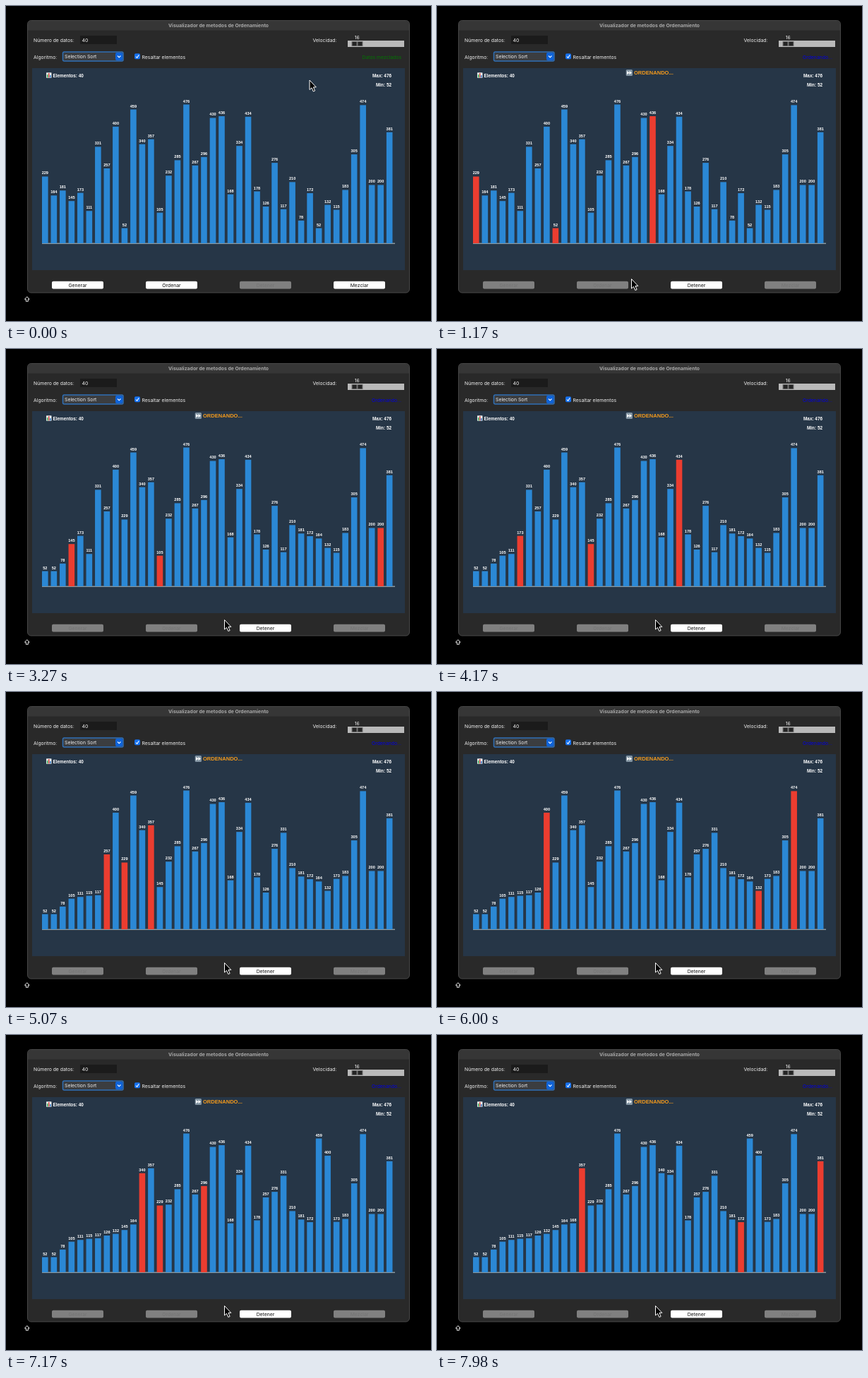
An HTML page for the animation above (8 s loop, 602 by 446 pixels).

```html
<!DOCTYPE html>
<html lang="es">
<head>
<meta charset="utf-8">
<title>Visualizador de metodos de Ordenamiento</title>
<style>
  html, body { margin: 0; width: 100%; height: 100%; overflow: hidden; background: #000; }
  svg { display: block; width: 100%; height: 100%; }
  text { font: 6.85px Inter, sans-serif; fill: #f0f0f0; white-space: pre; }
  .title { font-weight: 700; fill: #a9a9a9; }
  .plot text { font: 700 6.4px "Liberation Sans", Arial, sans-serif; fill: #fff; }
  .plot .value { font-size: 5.6px; }
  .plot .banner { font-size: 7.55px; fill: #f39a1c; }
  .mid { text-anchor: middle; }
  .end { text-anchor: end; }
  .button rect { fill: #fff; }
  .button text { fill: #111; }
  .button.off rect { fill: #808080; }
  .button.off text { fill: #747474; }
</style>
</head>
<body>
<svg viewBox="0 0 602 446">
  <rect x="30.5" y="20.5" width="541" height="385.5" rx="5" fill="#292929" stroke="#555" stroke-width=".8"/>
  <path d="M31 34.5V25.500q0-4.500 4.500-4.500h531q4.500 0 4.500 4.500v9z" fill="#363636"/>
  <text class="title mid" x="301" y="30">Visualizador de metodos de Ordenamiento</text>

  <text x="39" y="51">Número de datos:</text>
  <rect x="105" y="42" width="52" height="12" fill="#1b1b1b"/>
  <text x="107.500" y="50.500">40</text>

  <text x="39" y="74.500">Algoritmo:</text>
  <rect x="80.500" y="65" width="85.500" height="13" rx="2" fill="#3b3d40" stroke="#2f6fb5" stroke-width="1.500"/>
  <rect x="155" y="66" width="10.300" height="11" rx="2" fill="#0f63d8"/>
  <path d="M158 70.500l2.200 2.300 2.200-2.300" fill="none" stroke="#fff" stroke-width="1.100"/>
  <text x="83" y="74">Selection Sort</text>

  <rect x="182" y="67.300" width="8" height="8" rx="1.800" fill="#1671ee"/>
  <path d="M184 71.500l1.600 1.800 2.700-4" fill="none" stroke="#fff" stroke-width="1.100"/>
  <text x="192.500" y="74.500">Resaltar elementos</text>

  <text x="434.500" y="51">Velocidad:</text>
  <text class="mid" x="497.300" y="46.500">16</text>
  <rect x="484" y="49" width="80" height="9" fill="#b9b9b9"/>
  <rect x="489.500" y="50" width="16" height="7" fill="#777"/>
  <path d="M490.500 50.700h6v5.600h-6zM498.500 50.700h6v5.600h-6z" fill="#242424"/>
  <text class="end" id="status" x="560" y="74.500"></text>

  <g class="plot">
    <rect x="37" y="88" width="528" height="286" fill="#263647"/>
    <rect x="57" y="94.300" width="7.500" height="7.500" rx=".6" fill="#e9eef0"/>
    <path d="M58 97h1.500v4.300H58z" fill="#35a853"/>
    <path d="M60 95h1.500v6.300H60z" fill="#d94b42"/>
    <path d="M62 98h1.500v3.300H62z" fill="#3478c9"/>
    <text x="66.500" y="100.500">Elementos: 40</text>
    <text class="end" x="546" y="100.500">Max: 476</text>
    <text class="end" x="546" y="113.500">Min: 52</text>
    <g id="banner">
      <rect x="267.700" y="90" width="9.300" height="9" rx="1.500" fill="#8193a1"/>
      <path d="M269 92l3.500 2.500-3.500 2.500zM272.500 92l3.500 2.500-3.500 2.500z" fill="#fff"/>
      <text class="banner" x="279" y="97.200">ORDENANDO...</text>
    </g>
    <path d="M51 336.300H551" stroke="#8b979d" stroke-width="1.400"/>
    <g id="bars"></g>
  </g>
  <g id="buttons"></g>

  <path id="shift" d="M29.800 411.600l3.300 3.600h-1.800v3h-3v-3h-1.800z" fill="#000" stroke="#eee" stroke-width="1"/>
  <path id="cursor" d="M0 0V13.500L3 10.800 5.300 16 7.600 15 5.400 9.900H9.300z" fill="#000" stroke="#fff" stroke-width="1" stroke-linejoin="round"/>
</svg>
<script>
const LOOP = 8000, TICK = 30, SORT_START = 858, BASE = 336, SCALE = 0.4128;
const data = [
  229, 164, 181, 145, 173, 111, 331, 257, 400, 52, 459, 340, 357, 105, 232, 285, 476, 267, 296, 430,
  436, 168, 334, 434, 178, 126, 276, 117, 210, 78, 172, 52, 132, 115, 183, 305, 474, 200, 200, 381
];
// [time, comparisons made]
const pace = [[SORT_START, 0], [1170, 19.5], [2400, 95.5], [4170, 202.5], [6000, 311.5], [7170, 380.5], [7980, 428.5]];
// [time, x, y]
const route = [[60, 430, 105], [700, 240, 387], [860, 240, 388], [1170, 275.5, 386.5], [1590, 309.5, 383.5]];

const byId = id => document.getElementById(id);
const smooth = u => u * u * (3 - 2 * u);

function add(parent, tag, attrs, text = '') {
  const node = document.createElementNS('http://www.w3.org/2000/svg', tag);
  for (const key in attrs) node.setAttribute(key, attrs[key]);
  node.textContent = text;
  return parent.appendChild(node);
}

function track(points, t, ease = u => u) {
  if (t <= points[0][0]) return points[0].slice(1);
  const k = points.findIndex(p => p[0] > t);
  if (k < 0) return points[points.length - 1].slice(1);
  const [a, b] = [points[k - 1], points[k]];
  const u = ease((t - a[0]) / (b[0] - a[0]));
  return a.slice(1).map((v, n) => v + (b[n + 1] - v) * u);
}

function selectionSteps(source) {
  const list = [...source], steps = [];
  for (let i = 0; i < list.length - 1; i++) {
    const values = [...list];
    let min = i;
    for (let j = i + 1; j < list.length; j++) {
      steps.push({ values, marked: [i, min, j] });
      if (list[j] < list[min]) min = j;
    }
    [list[i], list[min]] = [list[min], list[i]];
  }
  return steps;
}

const steps = selectionSteps(data);
const idle = { values: data, marked: [] };

const bars = data.map((_, i) => {
  const x = 51 + i * 12.51;
  return {
    rect: add(byId('bars'), 'rect', { x, width: 8.6 }),
    label: add(byId('bars'), 'text', { x: x + 4.3, class: 'value mid' })
  };
});

const buttons = ['Generar', 'Ordenar', 'Detener', 'Mezclar'].map((name, i) => {
  const x = 65 + i * 133, group = add(byId('buttons'), 'g', {});
  add(group, 'rect', { x, y: 389.7, width: 73, height: 10.8, rx: 2 });
  add(group, 'text', { x: x + 36.5, y: 397.5, class: 'mid' }, name);
  return group;
});

function drawBars({ values, marked }) {
  bars.forEach(({ rect, label }, i) => {
    const height = values[i] * SCALE, top = BASE - height;
    rect.setAttribute('y', top);
    rect.setAttribute('height', height);
    rect.setAttribute('fill', marked.includes(i) ? '#eb3d30' : '#2b88d5');
    label.setAttribute('y', top - 3);
    label.textContent = values[i];
  });
}

function draw(time) {
  const t = time - time % TICK, sorting = t >= SORT_START;
  drawBars(sorting ? steps[Math.floor(track(pace, t)[0])] : idle);
  byId('banner').style.display = sorting ? '' : 'none';
  byId('status').textContent = sorting ? 'Ordenando...' : 'Datos mezclados';
  byId('status').style.fill = sorting ? '#0000e0' : '#007800';
  buttons.forEach((b, i) => b.setAttribute('class', sorting === (i === 2) ? 'button' : 'button off'));
  byId('shift').style.display = t >= 400 && t < 1400 ? 'none' : '';
  byId('cursor').setAttribute('transform', `translate(${track(route, t, smooth)})`);
}

const start = performance.now();
function loop() {
  draw((performance.now() - start) % LOOP);
  requestAnimationFrame(loop);
}
loop();
</script>
</body>
</html>
```
